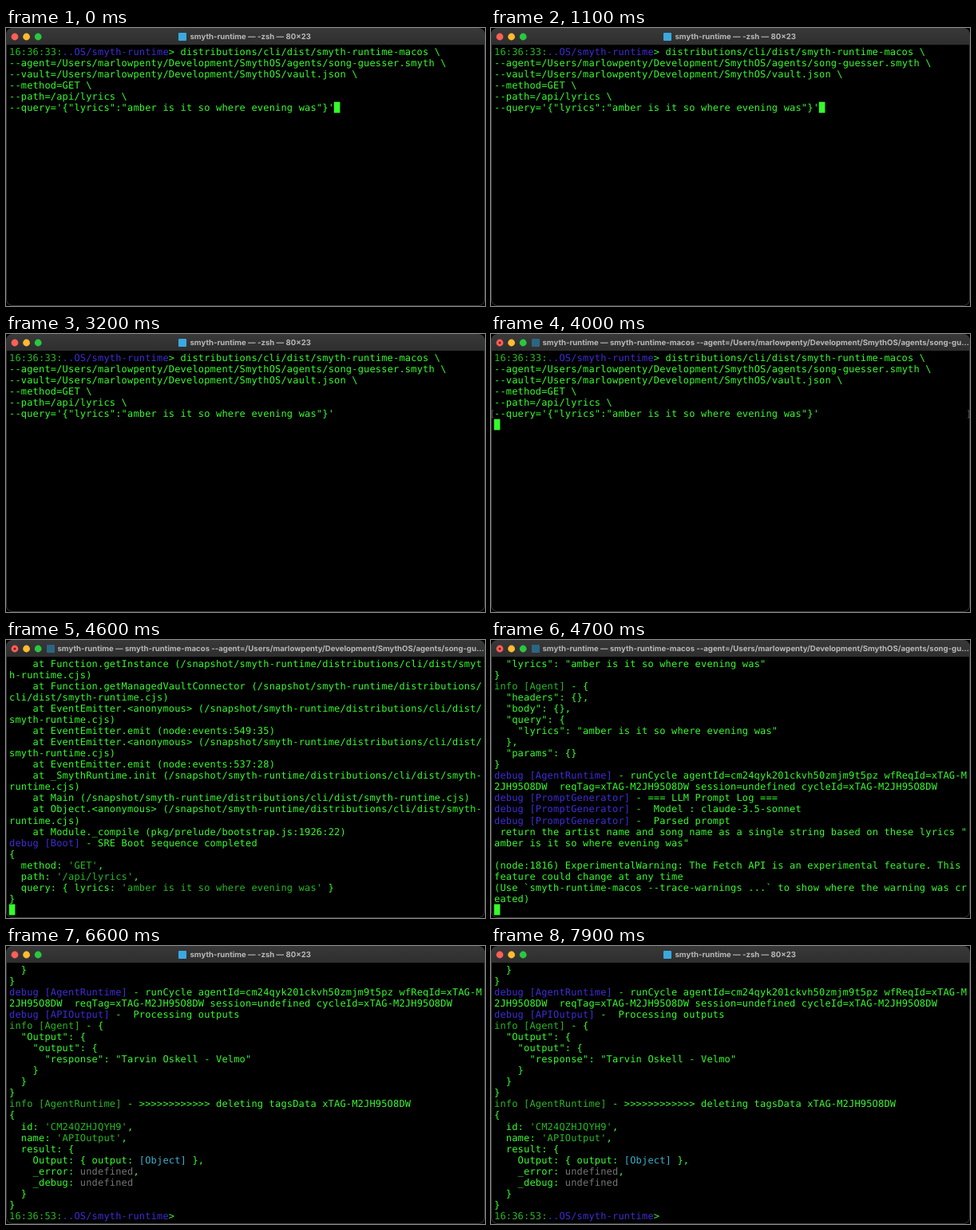
An HTML page that plays this animation: 600 px wide and 349 px high, repeating every 8 s.

```html
<!DOCTYPE html>
<html lang="en">
<head>
<meta charset="utf-8">
<title>Terminal session</title>
<style>
  html, body { margin: 0; width: 100%; height: 100%; overflow: hidden; background: #000; }
  svg { display: block; width: 100vw; height: 100vh; }
  text { white-space: pre; text-rendering: geometricPrecision; }
  .mono { font: 12px "DejaVu Sans Mono", "Liberation Mono", monospace; letter-spacing: .176px; }
  .title { font: 700 9.6px Inter, "Open Sans", sans-serif; fill: #b9b9ba; }
</style>
</head>
<body>
<svg id="stage" viewBox="0 0 600 349">
  <defs>
    <linearGradient id="bar" x1="0" y1="0" x2="0" y2="1">
      <stop offset="0" stop-color="#393839"/>
      <stop offset="1" stop-color="#2f2e2f"/>
    </linearGradient>
  </defs>
  <rect width="600" height="349" fill="#000"/>
  <path d="M.5 21V8Q.5 .5 8 .5H592Q599.5 .5 599.5 8V21Z" fill="url(#bar)"/>
  <rect x=".5" y=".5" width="599" height="348" rx="7.5" fill="none" stroke="#383838"/>
  <circle cx="11" cy="11" r="4.4" fill="#fe5f57"/>
  <circle cx="25.6" cy="11" r="4.4" fill="#febc2e"/>
  <circle cx="40.2" cy="11" r="4.4" fill="#28c840"/>
  <circle id="busyDot" cx="11" cy="11" r="1.5" fill="#7d1712"/>
  <rect id="icon" y="6" width="10" height="10" rx="1"/>
  <text id="title" class="title" y="14.2"></text>
  <g id="screens" class="mono"></g>
  <path id="marks" d="M3 96H1.2V105H3M597 96H598.8V105H597" fill="none" stroke="#666" stroke-width=".9"/>
  <rect id="cursor" width="7.6" height="13.8" fill="#34fd2a"/>
</svg>
<script>
const LOOP = 8000, BLINK = 1200, COLS = 80;
const CELL = 7.4, PITCH = 14.05, LEFT = 4, BASELINE = 33.8;
const COLORS = { t: '#36fc2c', g: '#27b924', b: '#3f2cd6', c: '#3eb0cd', d: '#747474' };
const $ = id => document.getElementById(id);

const user = 'marlowpenty';
const lyric = 'amber is it so where evening was';
const cjs = '(/snapshot/smyth-runtime/distributions/cli/dist/smyth-runtime.cjs)';
const tag = 'xTAG-M2JH95O8DW';
const runCycle = `~bdebug [AgentRuntime]~ - runCycle agentId=cm24qyk201ckvh50zmjm9t5pz wfReqId=${tag}  reqTag=${tag} session=undefined cycleId=${tag}`;
const prompt = time => `~g${time}:~~b..OS/smyth-runtime~> `;

// ~x...~ marks a run in colour x
const command = `${prompt('16:36:33')}distributions/cli/dist/smyth-runtime-macos \\
--agent=/Users/${user}/Development/SmythOS/agents/song-guesser.smyth \\
--vault=/Users/${user}/Development/SmythOS/vault.json \\
--method=GET \\
--path=/api/lyrics \\
--query='{"lyrics":"${lyric}"}'`;

const boot = `    at Function.getInstance ${cjs}
    at Function.getManagedVaultConnector ${cjs}
    at EventEmitter.<anonymous> ${cjs}
    at EventEmitter.emit (node:events:549:35)
    at EventEmitter.<anonymous> ${cjs}
    at EventEmitter.emit (node:events:537:28)
    at _SmythRuntime.init ${cjs}
    at Main ${cjs}
    at Object.<anonymous> ${cjs}
    at Module._compile (pkg/prelude/bootstrap.js:1926:22)
~bdebug [Boot]~ - SRE Boot sequence completed
{
  method: ~g'GET'~,
  path: ~g'/api/lyrics'~,
  query: { lyrics: ~g'${lyric}'~ }
}
`;

const request = `  "lyrics": "${lyric}"
}
~ginfo [Agent]~ - {
  "headers": {},
  "body": {},
  "query": {
    "lyrics": "${lyric}"
  },
  "params": {}
}
${runCycle}
~bdebug [PromptGenerator]~ - === LLM Prompt Log ===
~bdebug [PromptGenerator]~ -  Model : claude-3.5-sonnet
~bdebug [PromptGenerator]~ -  Parsed prompt
 return the artist name and song name as a single string based on these lyrics "${lyric}"

(node:1816) ExperimentalWarning: The Fetch API is an experimental feature. This feature could change at any time
(Use \`smyth-runtime-macos --trace-warnings ...\` to show where the warning was created)
`;

const response = `  }
}
${runCycle}
~bdebug [APIOutput]~ -  Processing outputs
~ginfo [Agent]~ - {
  "Output": {
    "output": {
      "response": "Tarvin Oskell - Velmo"
    }
  }
}
~ginfo [AgentRuntime]~ - >>>>>>>>>>>> deleting tagsData ${tag}
{
  id: ~g'CM24QZHJQYH9'~,
  name: ~g'APIOutput'~,
  result: {
    Output: { output: ~c[Object]~ },
    _error: ~dundefined~,
    _debug: ~dundefined~
  }
}
`;

const idle = { icon: 216, color: '#3aa9e0', text: 230.5, busy: false,
  title: 'smyth-runtime — -zsh — 80×23' };
const busy = { icon: 51, color: '#2a6684', text: 64.5, busy: true,
  title: `smyth-runtime — smyth-runtime-macos --agent=/Users/${user}/Development/SmythOS/agents/song-gu…` };

// The cursor blink restarts with each scene
const scenes = [
  { start: -200, bar: idle, body: command },
  { start: 4000, bar: busy, body: command + '\n', marks: true },
  { start: 4600, bar: busy, body: boot },
  { start: 4700, bar: busy, body: request },
  { start: 5700, bar: busy, body: response },
  { start: 6000, bar: idle, body: response + prompt('16:36:53') }
];

function set(node, attrs) {
  for (const key in attrs) node.setAttribute(key, attrs[key]);
  return node;
}

function add(parent, name, attrs) {
  return parent.appendChild(set(document.createElementNS('http://www.w3.org/2000/svg', name), attrs));
}

// Writes the lines with wrapping and leaves the cursor cell in the scene
function build(scene) {
  scene.group = add($('screens'), 'g', {});
  let row = -1, col = 0;
  for (const line of scene.body.split('\n')) {
    row++;
    col = 0;
    line.split('~').forEach((piece, i) => {
      const fill = COLORS[i % 2 ? piece[0] : 't'];
      let rest = i % 2 ? piece.slice(1) : piece;
      while (rest) {
        if (col === COLS) { row++; col = 0; }
        const part = rest.slice(0, COLS - col);
        add(scene.group, 'text', { x: LEFT + col * CELL, y: BASELINE + row * PITCH, fill }).textContent = part;
        col += part.length;
        rest = rest.slice(part.length);
      }
    });
  }
  scene.cursor = { x: LEFT - .2 + col * CELL, y: BASELINE - 11.3 + row * PITCH };
}

const show = (node, on) => set(node, { visibility: on ? 'visible' : 'hidden' });
let current;

function enter(scene) {
  current = scene;
  for (const s of scenes) show(s.group, s === scene);
  const bar = scene.bar;
  set($('icon'), { x: bar.icon, fill: bar.color });
  set($('title'), { x: bar.text }).textContent = bar.title;
  show($('busyDot'), bar.busy);
  show($('marks'), scene.marks);
  set($('cursor'), scene.cursor);
}

function render(time) {
  const scene = scenes.filter(s => s.start <= time).pop();
  if (scene !== current) enter(scene);
  show($('cursor'), (time - scene.start) % BLINK < BLINK / 2);
}

scenes.forEach(build);
render(0);
const origin = performance.now();
requestAnimationFrame(function tick() {
  render((performance.now() - origin) % LOOP);
  requestAnimationFrame(tick);
});
</script>
</body>
</html>
```
